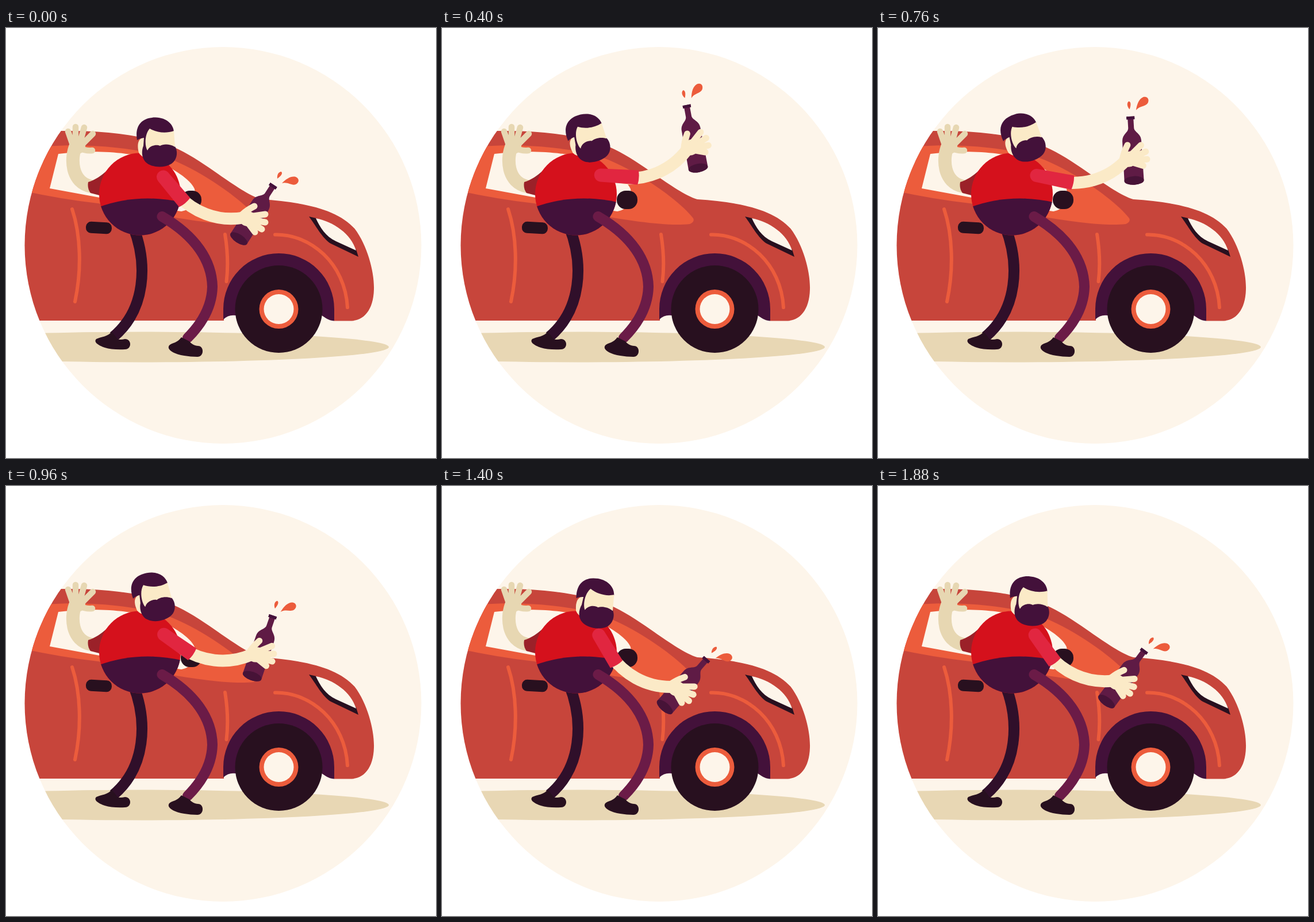
Recreate the animation shown at these times as an HTML page. Size 748x748 px, loop 1920 ms.

```html
<!DOCTYPE html>
<html lang="en">
<head>
<meta charset="utf-8">
<title>Cheers by the car</title>
<style>
html, body { margin: 0; width: 100%; height: 100%; overflow: hidden; background: #fff }
svg { display: block; width: 100%; height: 100% }
.dark { fill: #28101f }
.plum { fill: #43113a }
.orange { fill: #ec5c3c }
.cream { fill: #fdf5ea }
.skin { fill: #fbeac7; stroke: #fbeac7; stroke-width: 0 }
.far { fill: #e7d7b2; stroke: #e7d7b2; stroke-width: 0 }
.line { fill: none; stroke-linecap: round }
</style>
</head>
<body>
<svg viewBox="0 0 748 748">
  <clipPath id="disc"><circle cx="377.5" cy="378" r="345"/></clipPath>
  <circle class="cream" cx="377.5" cy="378" r="345"/>

  <g clip-path="url(#disc)">
    <ellipse cx="236" cy="555" rx="430" ry="26.5" fill="#e8d7b4"/>
    <!-- car -->
    <path fill="#c7453b" d="M0 179H110C185 179 255 189 300 211C350 235 407 287 444 298C520 303 577 316 606.5 349C629 379 641 425 640 455C639 491 622 510 598 509.5H571V490H379V509H0Z"/>
    <path class="orange" d="M20 281L70 206C150 200 250 210 300 234C350 256 415 302 437 331Q440 337 431 341C380 347 280 328 160 305Q90 297 20 281Z"/>
    <path class="cream" d="M91 219C150 211 230 215 270 235C300 250 322 266 328 280C332 300 325 315 305 319L250 311L76 279Z"/>
    <rect class="dark" x="304" y="283" width="36" height="32" rx="15.5"/>
    <rect class="dark" x="139" y="337.5" width="45" height="20" rx="9" transform="rotate(3 161 347)"/>
    <path class="line" stroke="#ec5c3c" stroke-width="6" d="M115 315C130 360 132 420 120 476M381 359C386 390 386 420 383.5 441M468 359.5C530 358 590 410 594 486"/>
    <path class="dark" d="M527 328L540 331L574 370L609 385L613 398L565 375C550 366 538 342 527 328Z"/>
    <path class="cream" d="M539 331C570 337 600 358 609 387L574 371C556 363 546 346 539 331Z"/>
    <path class="plum" d="M378 507V489A96.5 97 0 0 1 571 489V509.5C560 509 555 503 549 500H400Q387 498 378 507Z"/>
    <circle class="dark" cx="474.5" cy="489" r="76"/>
    <circle class="orange" cx="474.5" cy="489" r="34"/>
    <circle class="cream" cx="474.5" cy="489" r="26"/>
  </g>

  <!-- far arm -->
  <path class="far line" style="fill:none;stroke-width:23" d="M150 276C112 270 112 224 122 204"/>
  <path class="far line" style="fill:none;stroke-width:10.5" d="M116 203L108 180M121 202L121 172M128 202L136 173M131 204L151 184M128 209Q138 214 150 213"/>
  <ellipse class="far" cx="124" cy="207" rx="14" ry="12"/>
  <path fill="#9b2129" d="M196 231C179 241 169 260 143 268Q141 279 147 287L170 293Z"/>

  <!-- legs and belly -->
  <path fill="none" stroke="#300f2a" stroke-width="19" d="M221 345C247 410 243 490 187 537"/>
  <path class="dark" d="M184 528C178 537 165 537 157 541C152 546 160 552 172 556Q185 560 207 559C219 559 219 541 207 541Q198 543 194 541Z"/>
  <clipPath id="belly"><ellipse cx="233" cy="289" rx="71" ry="71.5"/></clipPath>
  <g clip-path="url(#belly)">
    <rect x="160" y="215" width="146" height="147" fill="#d5111c"/>
    <path class="plum" d="M155 314Q228 285 310 304V365H155Z"/>
  </g>
  <path class="line" stroke="#6b1b47" stroke-width="18" d="M271.5 328C330 362 358 405 359 450C358 490 335 520 316 539"/>
  <path class="dark" d="M305 538C298 548 290 547 284 552C278 560 295 568 310 570Q321 572 333 572C345 572 345 553 334 553C328 553 322 549 319 545Z"/>

  <g id="head">
    <path class="skin" d="M242 190C228 191 228 205 231 217Q235 224 244 226Z"/>
    <path class="plum" d="M228 195C224 172 234 155.5 260 155.5C280 156 291 168 292 180L275 192L294 206C300 216 297 230 288 236C275 244 255 243 245 235C236 228 235 215 239 205L240 191Q232 192 228 195Z"/>
    <path class="skin" d="M250 175C262 182 278 184 292 179L294 207C284 201 273 202 268 205C262 202 250 204 246 213C241 205 241 185 250 175Z"/>
  </g>

  <g id="arm">
    <g transform="translate(402 371) rotate(33)">
      <path fill="#5f1b45" d="M-17 -5L-16.5 -74C-16.5 -87 -5 -89 -5 -97V-112H-7V-117H7V-112H5V-97C5 -89 16.5 -87 16.5 -74L17 -5A17 7 0 0 1 -17 -5Z"/>
      <path class="plum" d="M-7 -117H7V-112H-7Z"/>
      <ellipse cx="0" cy="-5.5" rx="17" ry="7.5" fill="#471337"/>
    </g>
    <path class="orange" d="M480 270C488 262 496 257 504 259C511 262 510 269 504 272C497 275 490 267 480 270ZM472 262C471 256 474 250 479 250C482 253 478 258 472 262Z"/>
    <path class="skin line" style="fill:none;stroke-width:21" d="M300 292C325 318 365 338 413 330"/>
    <path class="skin line" style="fill:none;stroke-width:11" d="M410 325Q420 316 432 310M424 328L451 324M424 333L451 338M423 337L445 350M421 339L433 355"/>
    <ellipse class="skin" cx="421" cy="332" rx="15" ry="13"/>
    <path id="sleeve" fill="#e12640"/>
  </g>
</svg>
<script>
const LOOP = 1920, STEP = 40;
const el = id => document.getElementById(id);

// [time in ms, angle in degrees]
const armKeys = [[0, 0], [240, -47.3], [280, -50.5], [560, -32.5], [700, -39],
  [960, -14], [1400, 8.2], [1600, 17.4], [1880, 3.7]];
const headKeys = [[0, 0], [240, -8.5], [600, -18], [960, -11],
  [1400, 9], [1500, 9.4], [1600, 9], [1880, 3]];

// Smooth periodic curve through the keys that never overshoots them
function curve(keys, t) {
  const n = keys.length;
  const at = i => {
    const [kt, v] = keys[(i + n) % n];
    return [kt + LOOP * Math.floor(i / n), v];
  };
  const slope = i => {
    const [a, u] = at(i), [b, v] = at(i + 1);
    return (v - u) / (b - a);
  };
  const tangent = i => {
    const a = slope(i - 1), b = slope(i);
    return a * b > 0 ? 2 * a * b / (a + b) : 0;
  };
  let i = n - 1;
  while (keys[i][0] > t) i--;
  const [a, u] = at(i), [b, v] = at(i + 1), d = b - a, s = (t - a) / d, r = 1 - s;
  return r * r * (1 + 2 * s) * u + s * s * (3 - 2 * s) * v
    + d * s * r * (r * tangent(i) - s * tangent(i + 1));
}

function draw(now) {
  const t = Math.floor(now % LOOP / STEP) * STEP;
  const arm = curve(armKeys, t), len = 58 + Math.abs(arm) * .16;
  el("head").setAttribute("transform", `rotate(${curve(headKeys, t)} 230 231)`);
  el("arm").setAttribute("transform", `rotate(${arm} 271 254)`);
  // The sleeve bends slightly against the forearm
  el("sleeve").setAttribute("transform", `translate(273.5 259) rotate(${50 + arm * .07})`);
  el("sleeve").setAttribute("d",
    `M0 -11.5L${len} -12.5Q${len + 3} 0 ${len} 12.5L0 11.5A11.5 11.5 0 0 1 0 -11.5Z`);
}

const start = performance.now();
function tick() {
  draw(performance.now() - start);
  requestAnimationFrame(tick);
}
tick();
</script>
</body>
</html>
```
